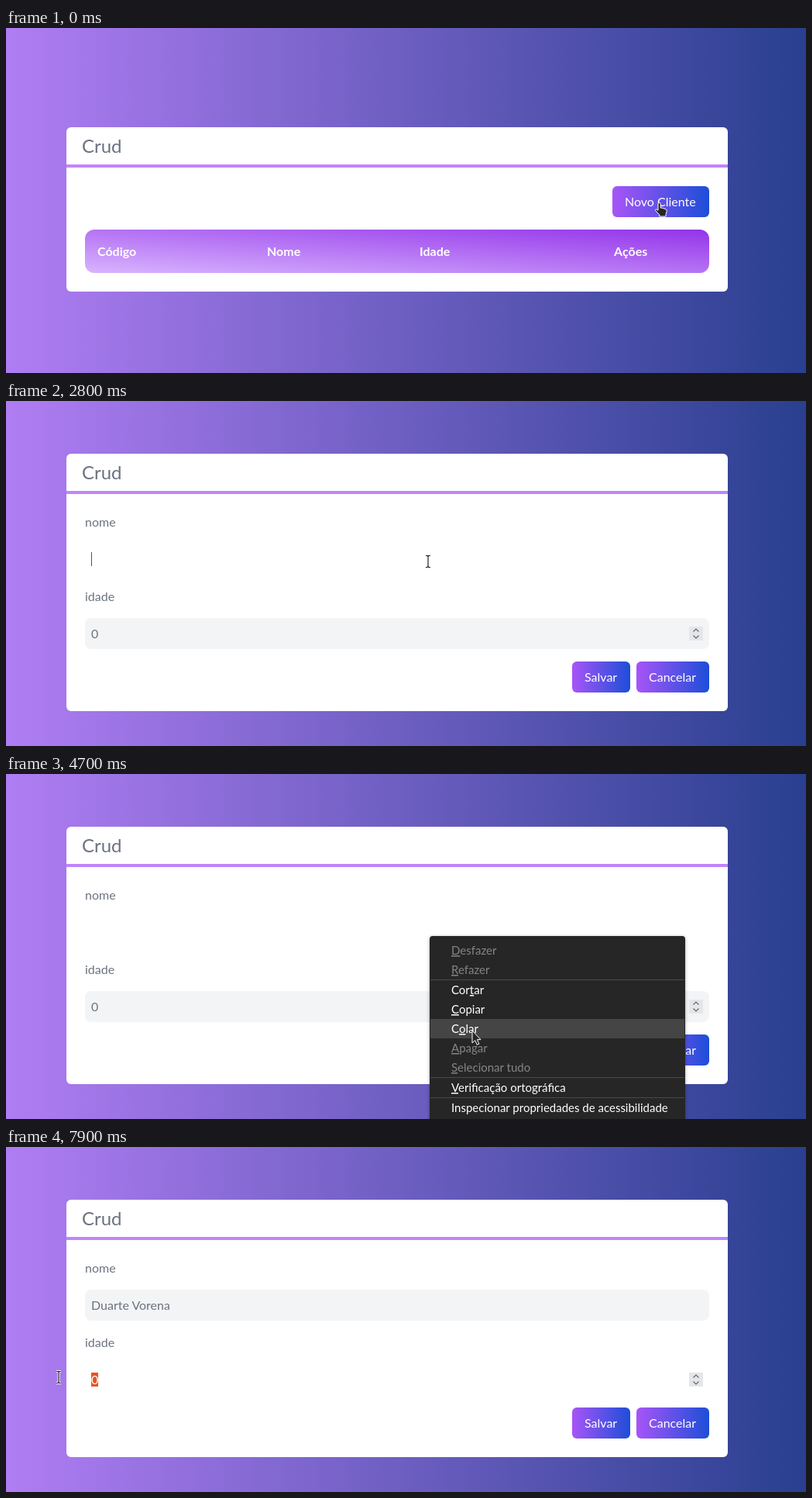
An HTML page that plays this animation: 1033 by 445 pixels, repeating every 8000 ms.

```html
<!DOCTYPE html>
<html lang="pt-BR">
<head>
<meta charset="utf-8">
<title>Crud</title>
<style>
  html, body { margin: 0; width: 100%; height: 100%; overflow: hidden; }
  svg { display: block; width: 1033px; height: 445px; }
  text { font: 16px Lato, sans-serif; fill: #6b7280; }
  .title { font-size: 24px; }
  .head text { font-weight: 700; fill: #fff; }
  .button rect { fill: url(#button); }
  .button text { fill: #fff; }
  .field { fill: #f3f4f6; }
  .field.focus { fill: #fff; }
  .menu text { font-size: 15px; fill: #fff; }
  .menu .off { fill: #858585; }
  .menu tspan { text-decoration: underline; text-underline-offset: 2px; text-decoration-thickness: 1px; }
  .menu path { stroke: #4a4a4a; }
  .caret { fill: #4b5563; }
  .selected { fill: #fff; }
</style>
</head>
<body>
<svg viewBox="0 0 1033 445" xmlns="http://www.w3.org/2000/svg">
  <defs>
    <linearGradient id="page">
      <stop stop-color="#b07df3"/><stop offset="1" stop-color="#293f8f"/>
    </linearGradient>
    <linearGradient id="button">
      <stop stop-color="#a855f7"/><stop offset="1" stop-color="#1d4ed8"/>
    </linearGradient>
    <linearGradient id="table" x1="0" y1="1" x2="1" y2="0">
      <stop stop-color="#d8b4fe"/><stop offset="1" stop-color="#9333ea"/>
    </linearGradient>
    <filter id="shadow" x="-5%" y="-5%" width="110%" height="110%">
      <feDropShadow dx="0" dy="1" stdDeviation="2" flood-opacity=".35"/>
    </filter>
  </defs>

  <rect width="1033" height="445" fill="url(#page)"/>

  <g id="list">
    <rect x="78" y="128" width="854" height="212" rx="6" fill="#fff"/>
    <rect x="78" y="176" width="854" height="4" fill="#c084fc"/>
    <text class="title" x="98" y="161">Crud</text>
    <g class="button">
      <rect x="783" y="204" width="125" height="40" rx="6"/>
      <text x="799" y="230">Novo Cliente</text>
    </g>
    <g class="head">
      <rect x="102" y="260" width="806" height="56" rx="12" fill="url(#table)"/>
      <text x="118" y="294">Código</text>
      <text x="337" y="294">Nome</text>
      <text x="534" y="294">Idade</text>
      <text x="785" y="294">Ações</text>
    </g>
  </g>

  <g id="form">
    <rect x="78" y="68" width="854" height="332" rx="6" fill="#fff"/>
    <rect x="78" y="116" width="854" height="4" fill="#c084fc"/>
    <text class="title" x="98" y="101">Crud</text>
    <text x="102" y="162">nome</text>
    <rect id="nameField" class="field" x="102" y="184" width="806" height="40" rx="8"/>
    <text id="name" x="110" y="210">Duarte Vorena</text>
    <text x="102" y="258">idade</text>
    <rect id="ageField" class="field" x="102" y="280" width="806" height="40" rx="8"/>
    <rect id="selection" x="110" y="291" width="9" height="18" fill="#e95420"/>
    <text id="age" x="110" y="306">0</text>
    <rect x="882" y="291" width="18" height="18" fill="#e4e6e9"/>
    <path d="M887.5 297.5l3.5-3.5 3.5 3.5M887.5 302.5l3.5 3.5 3.5-3.5" fill="none" stroke="#666" stroke-width="1.2"/>
    <g class="button">
      <rect x="731" y="336" width="75" height="40" rx="6"/>
      <text x="747" y="362">Salvar</text>
      <rect x="814" y="336" width="94" height="40" rx="6"/>
      <text x="830" y="362">Cancelar</text>
    </g>
    <rect id="caret" class="caret" width="1" height="18"/>
  </g>

  <g id="menu" class="menu">
    <rect x="547" y="209" width="330" height="250" rx="4" fill="#262626" filter="url(#shadow)"/>
    <rect id="hover" x="548" width="328" height="25" fill="#454545"/>
    <path d="M548 265.5H876M548 391.5H876M548 417.5H876"/>
    <text class="off" x="575" y="233"><tspan>D</tspan>esfazer</text>
    <text class="off" x="575" y="258"><tspan>R</tspan>efazer</text>
    <text x="575" y="284">Cor<tspan>t</tspan>ar</text>
    <text x="575" y="309"><tspan>C</tspan>opiar</text>
    <text x="575" y="334">C<tspan>o</tspan>lar</text>
    <text class="off" x="575" y="359"><tspan>A</tspan>pagar</text>
    <text class="off" x="575" y="384"><tspan>S</tspan>elecionar tudo</text>
    <text x="575" y="410"><tspan>V</tspan>erificação ortográfica</text>
    <text x="575" y="436">Inspecionar propriedades de acessibilidade</text>
  </g>

  <g id="pointer" stroke-linejoin="round">
    <path id="arrow" d="M0 0V16L3.7 12.6 6.2 18.3 8.9 17.1 6.4 11.6H11Z" fill="#262626" stroke="#fff"/>
    <g id="hand">
      <path d="M0 0Q0-1.7 1.6-1.7T3.2 0V5L5.5 5.2 8 6 10.3 7Q11.3 7.6 11.2 9.5L10 13.5V16H1.8V14L-3.3 8.6Q-4 7.2-2.5 6.8L0 8.2Z" fill="#262626" stroke="#fff"/>
    </g>
    <g id="ibeam" fill="none">
      <path d="M-3-7.5H-1L0-6.5 1-7.5H3M0-6.5V6.5M-3 7.5H-1L0 6.5 1 7.5H3" stroke="#fff" stroke-width="3"/>
      <path d="M-3-7.5H-1L0-6.5 1-7.5H3M0-6.5V6.5M-3 7.5H-1L0 6.5 1 7.5H3" stroke="#222" stroke-width="1.2"/>
    </g>
  </g>
</svg>

<script>
const LOOP = 8000, TICK = 100;
const el = id => document.getElementById(id);
const show = (id, on) => { el(id).style.display = on ? '' : 'none'; };
const within = (t, from, to) => t >= from && t < to;
const place = (id, x, y) => el(id).setAttribute('transform', `translate(${x} ${y})`);

// first tick, last tick, x, y reached at the last tick
const moves = [
  [100, 100, 842, 228],
  [2000, 2600, 545, 209], [2800, 2800, 545, 207],
  [3800, 4200, 601, 298], [4300, 4300, 601, 302],
  [4400, 4600, 602, 329], [4700, 4700, 602, 331],
  [5500, 5800, 598, 350], [5900, 6300, 427, 303], [6400, 6500, 425, 300],
  [7500, 7600, 140, 285], [7800, 7900, 68, 297]
];

function pointerAt(t) {
  let x = 842, y = 227;
  for (const [first, last, toX, toY] of moves) {
    if (t < first) break;
    const k = Math.min(1, (t - first + TICK) / (last - first + TICK));
    const eased = k * k * (3 - 2 * k);
    x += (toX - x) * eased;
    y += (toY - y) * eased;
  }
  return [Math.round(x), Math.round(y)];
}

function pointerKind(t, y) {
  if (t < 1600) return 'hand';
  if (within(t, 3800, 5100)) return 'arrow';
  return within(y, 184, 224) || within(y, 280, 320) ? 'ibeam' : 'arrow';
}

function draw(t) {
  const [x, y] = pointerAt(t);
  const kind = pointerKind(t, y);
  const menuOpen = within(t, 3400, 5100);
  const pasted = t >= 5100, ageFocused = t >= 6700, selected = t >= 7600;

  show('list', t < 1600);
  show('form', t >= 1600);
  show('menu', menuOpen);
  show('name', pasted);
  show('selection', selected);
  el('age').classList.toggle('selected', selected);
  el('nameField').classList.toggle('focus', within(t, 2600, 6700));
  el('ageField').classList.toggle('focus', ageFocused);

  show('caret', within(t, 2600, 3900) || within(t, 5100, 5600) || within(t, 6100, 7600));
  place('caret', ageFocused ? 119 : pasted ? 214 : 110, ageFocused ? 291 : 195);

  const row = Math.floor((y - 266) / 25);
  show('hover', menuOpen && within(row, 0, 3));
  el('hover').setAttribute('y', 266 + row * 25);

  for (const id of ['arrow', 'hand', 'ibeam']) show(id, id === kind);
  place('pointer', x, y);
}

function frame() {
  draw(Math.floor(performance.now() % LOOP / TICK) * TICK);
  requestAnimationFrame(frame);
}
frame();
</script>
</body>
</html>
```
